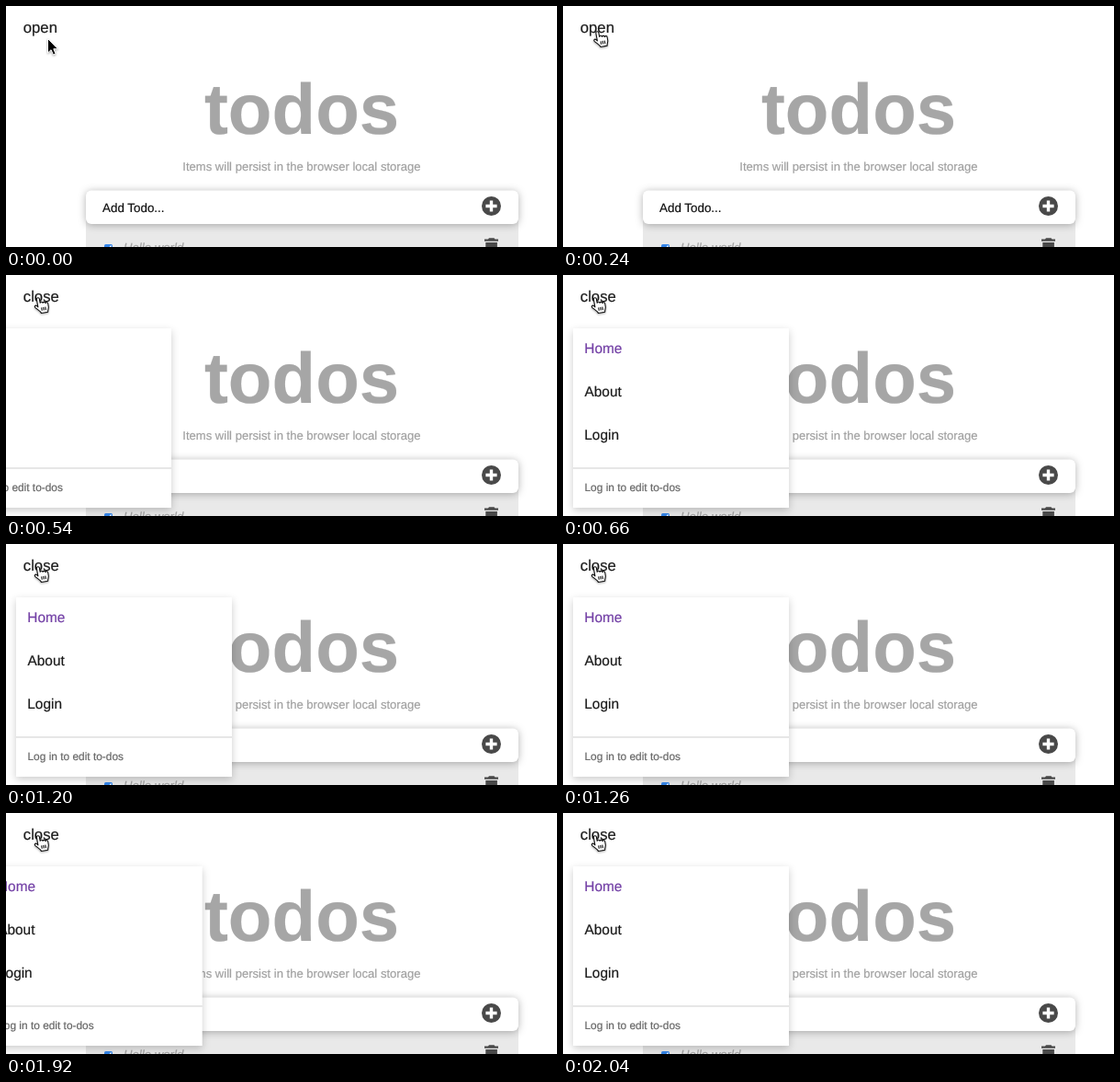
Animation, 600 px wide and 262 px high, one loop 2460 ms. Source, as an HTML page:

```html
<!DOCTYPE html>
<html lang="en">
<head>
<meta charset="utf-8">
<title>Todos</title>
<style>
  html, body { margin: 0; width: 100%; height: 100%; overflow: hidden; background: #fff; }
  svg { display: block; width: 600px; height: 262px; }
  text {
    font-family: "Liberation Sans", Arial, sans-serif;
    text-rendering: geometricPrecision;
    white-space: pre;
    color: #1c1c1c;
    fill: currentColor;
    stroke: currentColor;
    stroke-width: .2px;
  }
  .title { font-size: 78px; font-weight: 700; color: #a6a6a6; }
  .sub { font-size: 13.07px; color: #a0a0a0; }
  .field { fill: #fff; filter: drop-shadow(0 1px 4.5px rgba(0, 0, 0, .3)); }
  .add { font-size: 13.4px; color: #111; }
  .done { font-size: 13.2px; font-style: italic; color: #a3a3a3; }
  .toggle { font-size: 16.7px; }
  .panel { fill: #fff; filter: drop-shadow(0 3px 4px rgba(0, 0, 0, .2)); }
  .item { font-size: 15.4px; }
  .current { color: #7340a6; }
  .note { font-size: 11.9px; color: #666; }
</style>
</head>
<body>
<svg viewBox="0 0 600 262">
  <text class="title" x="215.9" y="139">todos</text>
  <text class="sub" x="192.3" y="178.5">Items will persist in the browser local storage</text>

  <path d="M87 230H558V262H87Z" fill="#e9e9e9"/>
  <rect class="field" x="87" y="200.5" width="471" height="36.5" rx="6"/>
  <text class="add" x="105" y="223.6">Add Todo...</text>
  <circle cx="528.5" cy="217.5" r="10.5" fill="#494949"/>
  <path d="M522.4 217.5h12.2M528.5 211.4v12.2" stroke="#fff" stroke-width="3.4"/>

  <rect x="107" y="259" width="9" height="9" rx="1.5" fill="#3585e8"/>
  <path d="M109 263.5l2 2 3.5-5" fill="none" stroke="#fff" stroke-width="1.3"/>
  <text class="done" x="128" y="266.5">Hello world</text>
  <path d="M526 252.2h5.5l1 1.2h3.5v2.4h-15v-2.4h4ZM522.3 257h12.6v9h-12.6Z" fill="#494949"/>

  <g id="menu">
    <rect class="panel" x="11" y="58" width="235" height="195"/>
    <text class="item current" x="23.3" y="85.4">Home</text>
    <text class="item" x="23.5" y="132.3">About</text>
    <text class="item" x="23.3" y="178.8">Login</text>
    <path d="M11 210h235" stroke="#dedede" stroke-width="1.6"/>
    <text class="note" x="23.5" y="235.4">Log in to edit to-dos</text>
  </g>

  <text id="label" class="toggle" x="18.8" y="29">open</text>
  <circle id="ring" cx="36" cy="22.7" r="33.3" fill="none" stroke="#111" stroke-width="1.6"/>

  <g id="pointer" style="filter: drop-shadow(0 1px 1px rgba(0, 0, 0, .35))">
    <path id="arrow" d="M0 0V15.5L3.6 12.2L6 17.6L8.6 16.5L6.3 11.2H11Z" fill="#000" stroke="#fff"/>
    <g id="hand" transform="translate(-6.1 -.6) rotate(-10 8 9)" stroke="#111" stroke-width="1.1" stroke-linejoin="round">
      <path fill="#fff" d="M4.6 11V2.4a1.5 1.5 0 0 1 3 0V7a1.5 1.5 0 0 1 2.9.4a1.5 1.5 0 0 1 2.8.7a1.4 1.4 0 0 1 2.6.9v3.4c0 2-1.4 3-1.6 5.6H7c-.4-2.2-3.2-4.2-5.6-7.2c-.8-1.2.6-2.6 1.9-1.6z"/>
      <path fill="none" d="M8.2 12v3.5M10.3 12v3.5M12.4 12v3.5"/>
    </g>
  </g>
</svg>
<script>
  const LOOP = 2460, TICK = 60, SLIDE = 140, TRAVEL = 246;
  // Each press hides the menu; the release slides it back in.
  const presses = [
    { down: 0, ring: 360, up: 480 },
    { down: 900, ring: 900, up: 1035 },
    { down: 1680, ring: 1680, up: 1839 }
  ];
  const $ = id => document.getElementById(id);
  const [menu, label, ring, pointer, arrow, hand] =
    ['menu', 'label', 'ring', 'pointer', 'arrow', 'hand'].map($);
  const clamp = v => Math.min(1, Math.max(0, v));
  const show = (el, on) => el.setAttribute('visibility', on ? 'visible' : 'hidden');
  const move = (el, x, y) => el.setAttribute('transform', `translate(${x} ${y})`);

  function draw(now) {
    const t = Math.floor(now % LOOP / TICK) * TICK;
    const press = presses.filter(p => p.down <= t).pop();
    const open = t > press.up;
    const left = 1 - clamp((t - press.up) / SLIDE);

    show(menu, open);
    move(menu, -TRAVEL * left ** 2.35, 0);
    label.textContent = open ? 'close' : 'open';
    show(ring, t >= press.ring && t < press.ring + 120);

    const k = clamp(t / 360);
    const p = k * k * (3 - 2 * k);
    move(pointer, 45.5 - 9.5 * p, 35.5 - 11.5 * p);
    show(arrow, p < .25);
    show(hand, p >= .25);
    requestAnimationFrame(draw);
  }
  draw(performance.now());
</script>
</body>
</html>
```
